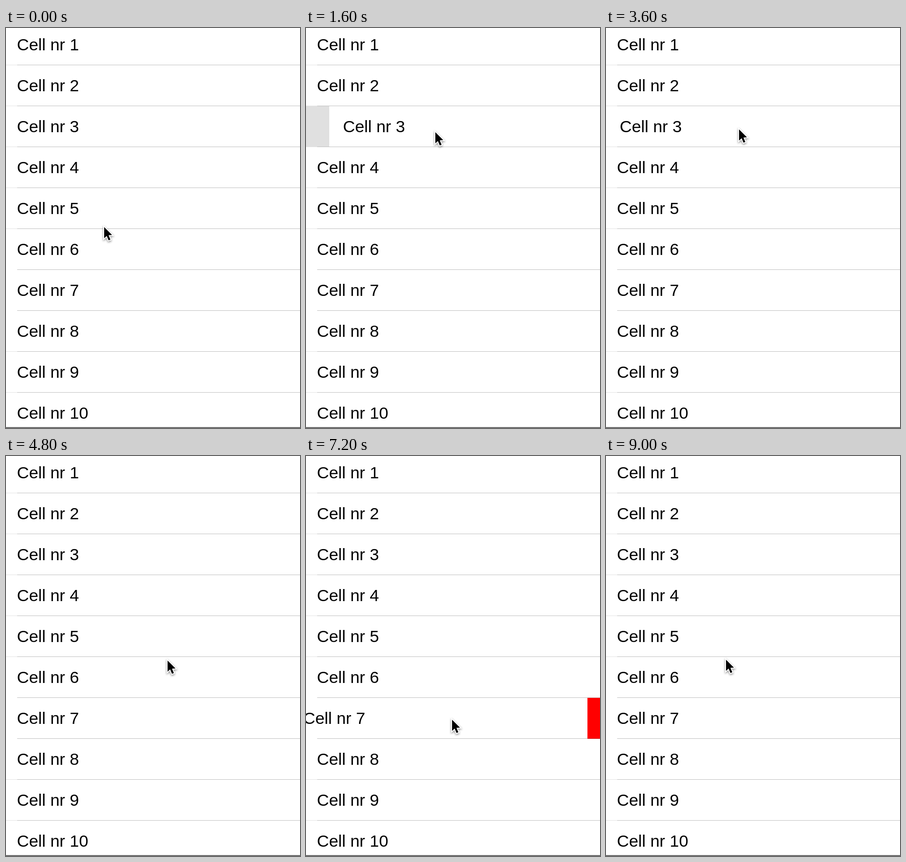
Animation of 632x860 px, one loop 9.1 s. Source, as an HTML page with a canvas:

```html
<!DOCTYPE html>
<html lang="en">
<head>
<meta charset="utf-8">
<title>Swipeable cells</title>
<style>
  html, body { margin: 0; width: 100%; height: 100%; overflow: hidden; background: #fff; }
  canvas { display: block; }
</style>
</head>
<body>
<canvas id="stage" width="632" height="860"></canvas>
<script>
const ctx = document.getElementById('stage').getContext('2d');
const WIDTH = 632, HEIGHT = 860, ROW = 88, INSET = 24;
const LOOP = 9100, STEP = 100;

// The pointer glides smoothly through these places.
const waypoints = [
  { t: 0, x: 211, y: 428 },
  { t: 1000, x: 162, y: 236 },
  { t: 1300, x: 166, y: 225 },
  { t: 1600, x: 278, y: 224 },
  { t: 2400, x: 398, y: 220 },
  { t: 2800, x: 436, y: 218 },
  { t: 3300, x: 296, y: 218 },
  { t: 3600, x: 286, y: 218 },
  { t: 4300, x: 290, y: 305 },
  { t: 5400, x: 419, y: 561 },
  { t: 5900, x: 282, y: 560 },
  { t: 6400, x: 218, y: 560 },
  { t: 7200, x: 314, y: 567 },
  { t: 8100, x: 302, y: 526 },
  { t: 8600, x: 58, y: 470 },
  { t: 9000, x: 258, y: 438 }
];

// A row is pulled aside until `peak`, returns by `back`, and its label realigns at `end`.
const swipes = [
  { row: 2, color: '#e0e0e0', start: 1400, peak: 2800, back: 3600, end: 4400, reach: 228, indent: 6 },
  { row: 6, color: '#ff0000', start: 5500, peak: 6200, back: 7480, end: 7900, reach: -235, indent: -2.5 }
];

function dragAt({ start, peak, back, reach }, t) {
  if (t < peak) return reach * (1 - (1 - (t - start) / (peak - start)) ** 1.6);
  const k = Math.min(1, (t - peak) / (back - peak));
  return reach * (1 + Math.cos(Math.PI * k)) / 2;
}

// Monotone cubic: never overshoots, and rests where the direction turns.
function glide(axis, t) {
  const slope = i => {
    const a = waypoints[i], b = waypoints[i + 1];
    return a && b ? (b[axis] - a[axis]) / (b.t - a.t) : 0;
  };
  const tangent = i => {
    const before = slope(i - 1), after = slope(i);
    return before * after > 0 ? 2 * before * after / (before + after) : 0;
  };
  const i = waypoints.findLastIndex(p => p.t <= t);
  const a = waypoints[i], b = waypoints[i + 1];
  if (!b) return a[axis];
  const span = b.t - a.t, k = (t - a.t) / span;
  const ease = k * k * (3 - 2 * k);
  return a[axis] + (b[axis] - a[axis]) * ease
    + span * k * (1 - k) * (tangent(i) * (1 - k) - tangent(i + 1) * k);
}

function rect(x, y, w, h, color) {
  ctx.fillStyle = color;
  ctx.fillRect(x, y, w, h);
}

function drawRow(index, t) {
  const bottom = index * ROW + 79;
  const swipe = swipes.find(s => s.row === index && t > s.start && t < s.end);
  let shift = 0;
  if (swipe) {
    const drag = Math.round(dragAt(swipe, t));
    shift = drag + swipe.indent;
    rect(drag > 0 ? 0 : WIDTH + drag, bottom - ROW + 1, Math.abs(drag), ROW, swipe.color);
  }
  ctx.fillStyle = '#000';
  ctx.fillText('Cell nr ' + (index + 1), INSET - 0.4 + shift, index * ROW + 48);

  ctx.globalCompositeOperation = 'darken';
  rect(INSET, bottom, WIDTH - INSET, 1, '#bfbfbf');
  if (index !== 5 && index !== 6) rect(0, bottom, INSET, 1, '#e3e3e3');
  ctx.globalCompositeOperation = 'source-over';
}

const arrow = new Path2D('M0 0V24L5.5 19L9.5 28.5L13.5 27L9.5 17.5L17 17Z');

function drawPointer(x, y) {
  ctx.save();
  ctx.translate(x, y);
  ctx.shadowColor = 'rgba(0,0,0,.45)';
  ctx.shadowBlur = 4;
  ctx.shadowOffsetY = 2;
  ctx.strokeStyle = '#fff';
  ctx.lineWidth = 4;
  ctx.stroke(arrow);
  ctx.shadowColor = 'transparent';
  ctx.fillStyle = '#000';
  ctx.fill(arrow);
  ctx.restore();
}

function draw(elapsed) {
  const t = Math.floor((elapsed % LOOP) / STEP) * STEP;
  rect(0, 0, WIDTH, HEIGHT, '#fff');
  ctx.font = '35.8px "Liberation Sans", Arial, sans-serif';
  for (let i = 0; i < 10; i++) drawRow(i, t);
  rect(0, 858, WIDTH, 2, '#6c6c6c');
  drawPointer(glide('x', t), glide('y', t));
}

let origin;
function tick(now) {
  origin ??= now;
  draw(now - origin);
  requestAnimationFrame(tick);
}
draw(0);
requestAnimationFrame(tick);
</script>
</body>
</html>
```
